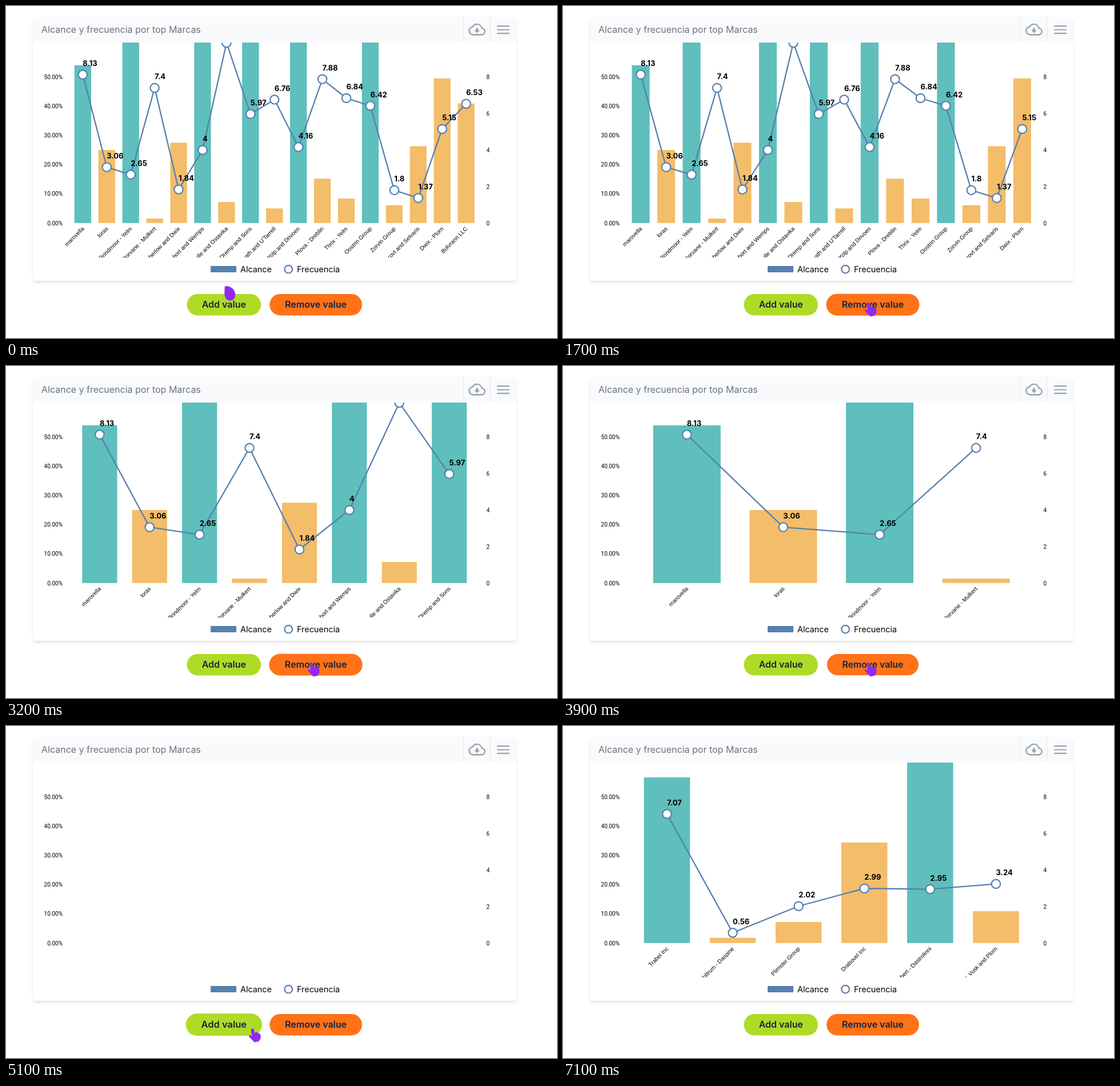
An HTML page for the animation above (7.4 s loop, 964x581 px).

```html
<!DOCTYPE html>
<html lang="es">
<head>
<meta charset="utf-8">
<title>Alcance y frecuencia</title>
<style>
  html, body { margin: 0; width: 100%; height: 100%; overflow: hidden; background: #fff; }
  svg { display: block; }
  text { font-family: Inter, sans-serif; }
  .card { position: absolute; left: 47px; top: 19px; width: 846px; height: 462px; border-radius: 8px;
    background: linear-gradient(#f9fafb 45px, #fff 45px);
    box-shadow: 0 4px 6px -1px rgba(0,0,0,.1), 0 2px 4px -1px rgba(0,0,0,.06); }
  #stage { position: absolute; left: 0; top: 0; }
  .axis text { font: 10px Roboto, sans-serif; }
  .name { font: 10px "Liberation Sans", Arial, sans-serif; }
  .value { font-size: 13px; font-weight: 700; }
  .legend { font-size: 14.4px; }
  .button text { font-size: 16px; font-weight: 600; fill: #17233b; text-anchor: middle; }
  .ring { fill: #fff; stroke: #5580b0; stroke-width: 2.2; }
</style>
</head>
<body>
<div class="card"></div>
<svg id="stage" width="964" height="581" viewBox="0 0 964 581">
  <clipPath id="plot"><rect x="47" y="64" width="846" height="376"/></clipPath>
  <text x="62" y="46.5" font-size="16" fill="#6b7280">Alcance y frecuencia por top Marcas</text>
  <path d="M800.5 19V64M847 19V64" stroke="#e5e7eb"/>
  <g transform="translate(809 26) scale(1.25)" fill="#9ca3af">
    <path transform="translate(1 1.04) scale(.917)" fill="none" stroke="#9ca3af" stroke-width="2.1"
      d="M19.35 10.04C18.67 6.59 15.64 4 12 4 9.11 4 6.6 5.64 5.35 8.04 2.34 8.36 0 10.91 0 14c0 3.31 2.69 6 6 6h13c2.76 0 5-2.24 5-5 0-2.64-2.05-4.78-4.65-4.96z"/>
    <path d="M8 13h2.55V10h2.9v3H16l-4 4z"/>
  </g>
  <path d="M859 35.2h22M859 41.5h22M859 47.8h22" stroke="#9ca3af" stroke-width="2.2"/>
  <g class="axis" id="axis"></g>
  <g id="chart" clip-path="url(#plot)"></g>
  <g class="legend">
    <rect x="358" y="455" width="45" height="11" fill="#5580b0"/>
    <text x="410" y="465.5">Alcance</text>
    <circle class="ring" cx="494.2" cy="460.7" r="6.8" stroke-width="2"/>
    <text x="509" y="465.5">Frecuencia</text>
  </g>
  <g class="button" id="add">
    <rect x="-64.8" y="-18.8" width="129.6" height="37.6" rx="18.8" fill="#aedc26"/>
    <text y="5.2">Add value</text>
  </g>
  <g class="button" id="remove">
    <rect x="-80.9" y="-18.8" width="161.8" height="37.6" rx="18.8" fill="#ff7218"/>
    <text y="5.2">Remove value</text>
  </g>
  <path id="cursor" fill="#9029f8"/>
</svg>
<script>
const $ = id => document.getElementById(id);
const LOOP = 7400, BASE = 379.8, LEFT = 107.1, WIDTH = 725.2, PAD = 0.3;

// name, reach in percent, frequency
const firstSet = [
  ['marovella', 54, 8.13], ['loras', 25, 3.06], ['Brindmoor - Yelm', 80, 2.65],
  ['Dorvane - Mulkert', 1.5, 7.4], ['Tamberlow and Dwix', 27.5, 1.84], ['Flabbort and Wemps', 80, 4],
  ['Brulle and Ostavika', 7.2, 9.87], ['Dremp and Sons', 80, 5.97], ["Vogwath and U'Tarrell", 5, 6.76],
  ['Yolp and Drivoen', 80, 4.16], ['Plova - Dreblin', 15.2, 7.88], ['Thrix - Yelm', 8.4, 6.84],
  ['Oostrin Group', 80, 6.42], ['Zorvin Group', 6.1, 1.8], ['Drovt and Selvaris', 26.3, 1.37],
  ['Dwix - Plorn', 49.5, 5.15], ['Bolvrann LLC', 40.9, 6.53], ['Tuskov and Nelb', 13.2, 1.32],
  ['Ulv LLC', 49.6, 7.97], ['Wimdrovsk - Ploger', 61.4, 0.55]
];
const secondSet = [
  ['Trabel Inc', 56.7, 7.07], ['Voltrum - Daspine', 1.8, 0.56], ['Plimster Group', 7.2, 2.02],
  ['Drabovel Inc', 34.4, 2.99], ['Vombert - Dastrolinni', 80, 2.95], ['Trolder, Vusk and Plorn', 10.9, 3.24]
];

const buttons = {
  add: { x: 381.3, y: 522.7, clicks: [340, 530, 720, 5150, 5330, 5510, 5690, 5820, 5950],
         hovers: [[60, 820], [4850, 6540]] },
  remove: { x: 542, y: 522.7, hovers: [[950, 4760]],
            clicks: [1200, 1320, ...Array.from({ length: 18 }, (_, i) => 1444 + 187 * i)] }
};

// time, x, y of the pointer tip
const route = [
  [0, 384, 491], [150, 398, 520], [760, 398, 520], [1000, 532.5, 520],
  [4680, 532.5, 520], [4950, 429.5, 530], [6500, 429.5, 530], [7000, 76, 3]
];
const DROP = 'M-1.5 1Q-1-1 2-1C10 0 17 5 17 14.5C17 21 13 24.5 8 24.5C1 24.5-1.5 18-1.7 12Z';
const HAND = 'M0 0Q3-2 4 1L6 7Q9 4 10 7Q13 6 13.5 8.5Q16 8.5 16 12V17Q15 19 13 21L13 22L5 23.5' +
  'Q2 20-1 17Q-6 13-4 11.5Q-2 10 1 13L-1 3Q-1.5 1 0 0Z';

const clamp = v => Math.min(1, Math.max(0, v));
const smooth = v => { v = clamp(v); return v * v * (3 - 2 * v); };
const count = (clicks, t) => clicks.filter(c => c <= t).length;

function drawChart(data) {
  const step = WIDTH / (data.length + PAD);
  let bars = '', marks = '', labels = '';
  const points = data.map(([name, reach, frequency], i) => {
    const x = LEFT + step * (i + PAD + (1 - PAD) / 2), y = BASE - frequency * 31.95, h = reach * 5.112;
    bars += `<rect x="${x - step * 0.35}" y="${BASE - h}" width="${step * 0.7}" height="${h}" fill="${reach > 50 ? '#5ebfbc' : '#f3bd6a'}"/>`;
    marks += `<circle class="ring" cx="${x}" cy="${y}" r="7.7"/>`;
    labels += `<text class="value" x="${x}" y="${y - 15}">${frequency}</text>` +
      `<text class="name" text-anchor="end" transform="translate(${x + 3} 390.5) rotate(-45)">${name}</text>`;
    return `${x},${y}`;
  });
  $('chart').innerHTML = bars +
    `<polyline points="${points.join(' ')}" fill="none" stroke="#5580b0" stroke-width="2.3"/>` + marks + labels;
}

function buttonScale({ clicks, hovers }, t) {
  const since = t - clicks.filter(c => c <= t).pop();
  if (since < 250) {
    return since < 100 ? 0.98 + 0.04 * since / 100 : 1.02 - 0.02 * (since - 100) / 150;
  }
  const hover = Math.max(...hovers.map(([a, b]) => smooth((t - a) / 200) * (1 - smooth((t - b) / 150))));
  const scale = 1 + 0.1 * hover, press = clamp((t - clicks.find(c => c > t) + 110) / 110 || 0);
  return scale + (0.97 - scale) * press;
}

function drawCursor(t) {
  const next = route.findIndex(p => p[0] > t);
  const b = route[next < 0 ? route.length - 1 : next], a = route[next < 0 ? route.length - 1 : next - 1];
  const k = smooth((t - a[0]) / (b[0] - a[0] || 1));
  const x = a[1] + (b[1] - a[1]) * k, y = a[2] + (b[2] - a[2]) * k;
  const over = y > 504 && y < 542 && (x > 316 && x < 446 || x > 461 && x < 623);
  $('cursor').setAttribute('d', t > 7050 ? '' : over ? HAND : DROP);
  $('cursor').setAttribute('transform', `translate(${x} ${y})`);
}

let axis = '';
for (let i = 0; i < 6; i++) axis += `<text x="99" y="${BASE + 3.7 - i * 51.12}" text-anchor="end">${i * 10}.00%</text>`;
for (let i = 0; i < 9; i += 2) axis += `<text x="840.5" y="${BASE + 3.7 - i * 31.95}">${i}</text>`;
$('axis').innerHTML = axis;

let shown = -1;
function render(now) {
  const t = Math.floor(now % LOOP / 100) * 100;
  if (t !== shown) {
    shown = t;
    const size = 17 + count(buttons.add.clicks, t) - count(buttons.remove.clicks, t);
    drawChart((t < 5000 ? firstSet : secondSet).slice(0, size));
    for (const [id, b] of Object.entries(buttons)) {
      $(id).setAttribute('transform', `translate(${b.x} ${b.y}) scale(${buttonScale(b, t)})`);
    }
    drawCursor(t);
  }
}
const start = performance.now();
function tick() {
  render(performance.now() - start);
  requestAnimationFrame(tick);
}
tick();
</script>
</body>
</html>
```
